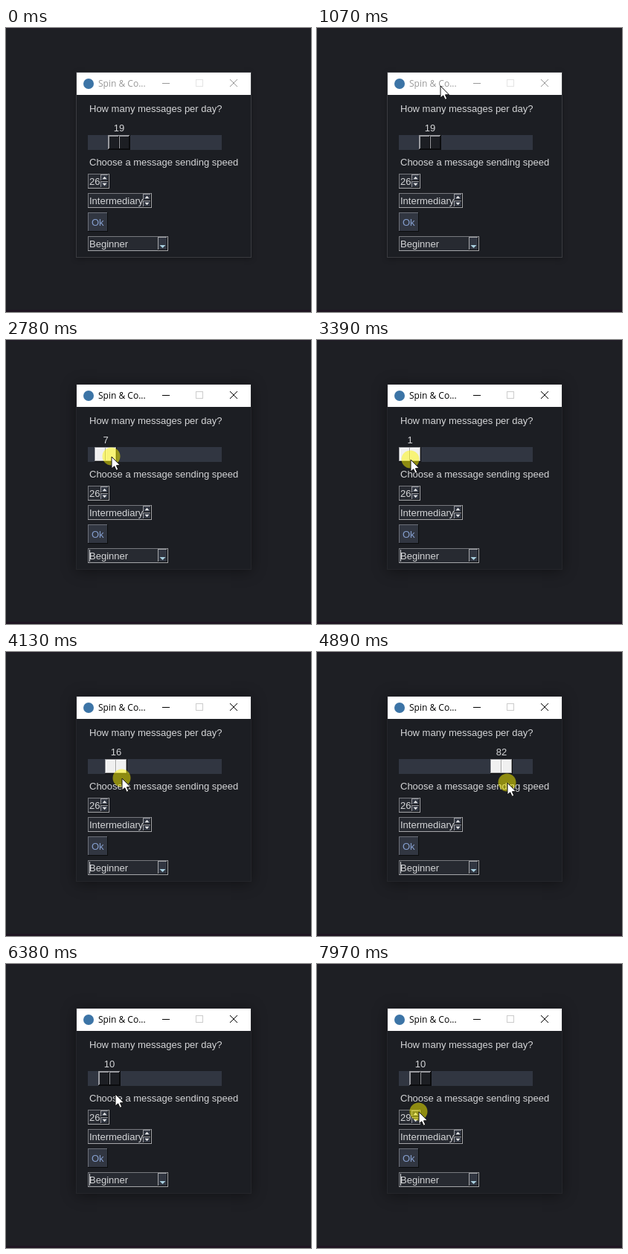
Recreate the animation shown at these times as an HTML page with a canvas. Size 410 px wide and 382 px high, loop 8000 ms.

```html
<!DOCTYPE html>
<html lang="en">
<head>
<meta charset="utf-8">
<title>Slider and spin window</title>
<style>
html, body { margin: 0; width: 410px; height: 382px; overflow: hidden; background: #1e1f24; }
canvas { display: block; }
</style>
</head>
<body>
<canvas id="stage" width="410" height="382"></canvas>
<script>
const g = document.getElementById('stage').getContext('2d');
const LOOP = 8000;
const ARIAL = '13px "Liberation Sans", Arial, sans-serif';
const TITLE = '12px "Open Sans", "Noto Sans", sans-serif';
const TEXT = '#d4d5d7', BACK = '#1c1e23', INPUT = '#272a31', RAISED = '#313641';
const LIGHT = '#9a9ba0', DARK = '#0b0c0e';

const ACTIVATE = 1080, GRAB = 2230, RELEASE = 6330, SPIN = 7320;

// Pointer moves: start, end, and the tip's new place; it rests in between
const HOME = [187, -18];
const moves = [
  [210, 950, 166, 78],
  [1200, 1460, 168, 135],
  [1640, 1960, 160, 152],
  [2300, 3240, 126, 161],
  [3410, 4130, 156, 170],
  [4230, 4950, 258, 176],
  [5050, 5400, 285, 177],
  [5520, 5840, 259, 176],
  [5860, 6290, 147, 175],
  [6480, 7200, 137, 199]
];

const clamp = (v, lo, hi) => Math.min(hi, Math.max(lo, v));
const ease = k => k * k * (3 - 2 * k);

function pointerAt(t) {
  let [x, y] = HOME;
  for (const [from, to, nx, ny] of moves) {
    const e = ease(clamp((t - from) / (to - from), 0, 1));
    x += (nx - x) * e;
    y += (ny - y) * e;
  }
  return [Math.round(x), Math.round(y)];
}

// The thumb follows the pointer, which holds it 8px right of its centre
function sliderAt(t) {
  const [x] = pointerAt(clamp(t, GRAB, RELEASE));
  return clamp(Math.round((x - 133) * 99 / 150) + 1, 1, 100);
}

const thumbX = value => Math.round(110 + (value - 1) * 150 / 99);
const spinAt = t => 26 + clamp(Math.floor((t - 7560) / 130), 0, 3);
const caretAt = t => t >= ACTIVATE && (t - 340) % 1600 >= 500;
const dragging = t => t >= GRAB && t < RELEASE;
const pressed = t => (t >= ACTIVATE && t < ACTIVATE + 140) || dragging(t) || t >= SPIN;

function box(x, y, w, h, color) {
  g.fillStyle = color;
  g.fillRect(x, y, w, h);
}

function bevel(x, y, w, h, fill, light = LIGHT, dark = DARK) {
  box(x, y, w, h, dark);
  box(x, y, w - 1, h - 1, light);
  box(x + 1, y + 1, w - 2, h - 2, fill);
}

function text(s, x, y, color = TEXT, font = ARIAL, align = 'left') {
  g.font = font;
  g.fillStyle = color;
  g.textAlign = align;
  g.fillText(s, x, y);
}

function poly(points, color) {
  g.beginPath();
  points.forEach(([x, y]) => g.lineTo(x, y));
  g.closePath();
  g.fillStyle = color;
  g.fill();
}

// Triangle pointing down for a positive height, up for a negative one
function arrow(x, y, half, height, color) {
  poly([[x - half, y - height / 2], [x + half, y - height / 2], [x, y + height / 2]], color);
}

function disc(x, y, r, color) {
  g.beginPath();
  g.arc(x, y, r, 0, 7);
  g.fillStyle = color;
  g.fill();
}

function line(x0, y0, x1, y1) {
  g.beginPath();
  g.moveTo(x0, y0);
  g.lineTo(x1, y1);
  g.stroke();
}

function drawWindow(active) {
  box(0, 0, 410, 382, '#1e1f24');
  box(0, 0, 410, 1, '#1f1a25');
  box(0, 379, 410, 3, '#1f1622');
  g.save();
  g.shadowColor = `rgba(0,0,0,${active ? 0.42 : 0.25})`;
  g.shadowBlur = active ? 18 : 7;
  g.shadowOffsetY = 2;
  box(94, 59, 236, 250, active ? '#25262b' : '#3a3b40');
  g.restore();
  box(95, 60, 234, 248, BACK);
  box(95, 60, 234, 30, '#fff');
  disc(111, 75, 7, '#3c74a6');
  const ink = active ? '#000' : '#999';
  text('Spin & Co...', 124, 79, ink, TITLE);
  box(210, 74, 10, 1, ink);
  g.lineWidth = 1;
  g.strokeStyle = active ? '#ccc' : '#e4e4e4';
  g.strokeRect(255.5, 69.5, 9, 9);
  g.strokeStyle = ink;
  line(301, 69, 311, 79);
  line(311, 69, 301, 79);
}

function drawSlider(value, lit) {
  const x = thumbX(value);
  box(110, 144, 180, 20, RAISED);
  text(value, x + 15, 139, TEXT, ARIAL, 'center');
  const half = lit ? ['#f0f0f0', '#fff', '#a0a0a0'] : [BACK];
  bevel(x, 144, 30, 20, BACK);
  bevel(x + 1, 145, 14, 18, ...half);
  bevel(x + 15, 145, 14, 18, ...half);
}

function drawSpinner(y, w, label) {
  bevel(110, y, w, 20, INPUT, '#77797e', '#a5a6a9');
  text(label, 112, y + 15);
  const x = 110 + w - 12;
  for (const dir of [-1, 1]) {
    const mid = y + 10 + dir * 4.5;
    bevel(x, mid - 4.5, 11, 9, RAISED);
    arrow(x + 5.5, mid, 3, dir * 3.5, '#e2e3e5');
  }
}

function drawCombo(caret) {
  bevel(110, 280, 108, 20, INPUT, '#77797e', '#a5a6a9');
  text('Beginner', 112, 295);
  bevel(204, 281, 13, 18, RAISED, '#a5a6a9');
  arrow(210.5, 294, 4, 4, '#a9d0e0');
  if (caret) box(112, 282, 1, 16, TEXT);
}

function drawPointer(x, y) {
  g.save();
  g.translate(x, y);
  poly([[0, 0], [0, 16], [3.7, 12.8], [6.2, 18.3], [8.8, 17.2], [6.4, 11.8], [11.4, 11.6]], '#fff');
  g.strokeStyle = '#111';
  g.lineWidth = 1;
  g.stroke();
  g.restore();
}

function draw(t) {
  const [x, y] = pointerAt(t);
  const value = sliderAt(t);
  const left = thumbX(value);
  const hover = x >= left && x < left + 30 && y >= 144 && y < 164;

  drawWindow(t >= ACTIVATE);
  text('How many messages per day?', 112, 113);
  drawSlider(value, dragging(t) || hover);
  text('Choose a message sending speed', 112, 185);
  drawSpinner(196, 29, spinAt(t));
  drawSpinner(222, 86, 'Intermediary');
  bevel(110, 248, 27, 26, RAISED, '#6b6f78');
  text('Ok', 115, 266, '#86a0d0');
  drawCombo(caretAt(t));
  if (pressed(t)) disc(x - 0.5, y - 0.5, 12, 'rgba(255,247,0,.5)');
  drawPointer(x, y);
}

const start = performance.now();
function tick() {
  draw((performance.now() - start) % LOOP);
  requestAnimationFrame(tick);
}
tick();
</script>
</body>
</html>
```
